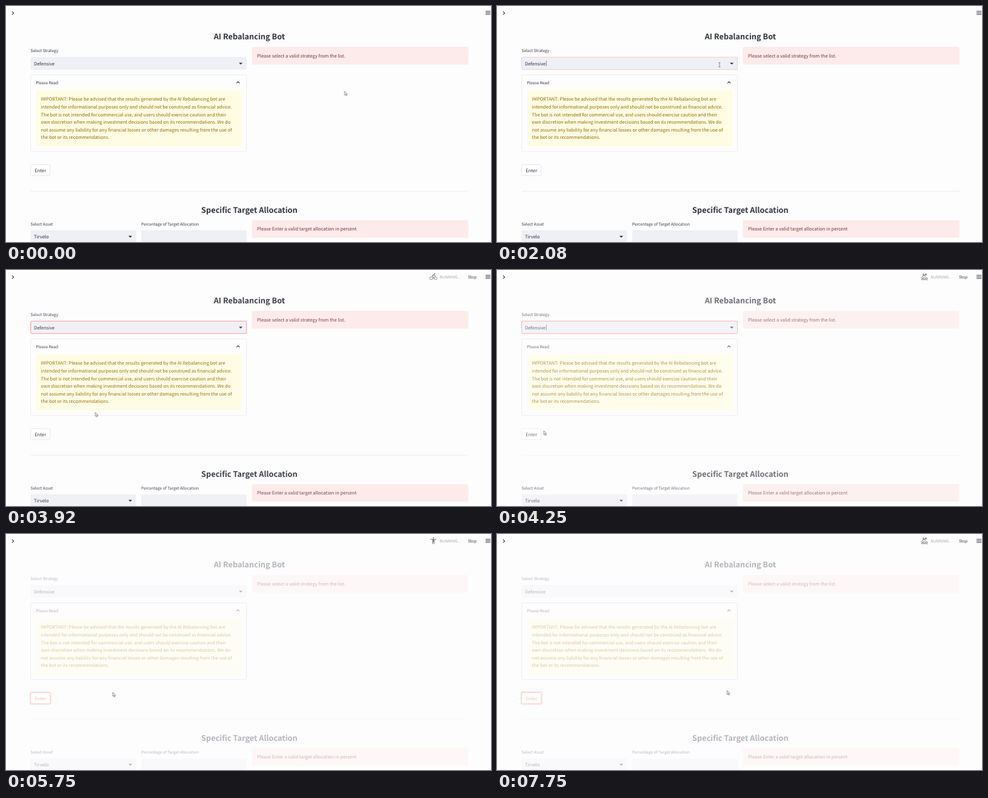
These frames come from a looping animation (800 by 389 pixels, 8000 ms). An HTML page:

```html
<!DOCTYPE html>
<html lang="en">
<head>
<meta charset="utf-8">
<title>Rebalancing dashboard</title>
<style>
  html, body { margin: 0; width: 100%; height: 100%; overflow: hidden; background: #fefdfe; }
  svg {
    display: block; width: 100%; height: 100%;
    font: 7.55px "Noto Sans CJK JP", "Noto Sans CJK SC", "Noto Sans CJK", "Noto Sans", sans-serif;
    fill: #31333f; text-rendering: geometricPrecision;
  }
  text { white-space: pre; }
  .label { font-size: 6.58px; }
  .title { font-size: 12.76px; font-weight: 600; text-anchor: middle; }
  .field { fill: #eff0f5; }
  .alert { fill: #fdeaea; }
  .error { fill: #7d353b; }
  .note { fill: #fffce4; }
  .warning { fill: #926c05; }
  .line { fill: none; stroke: #31333f; stroke-width: 1.1; }
  .frame { fill: none; stroke: #e0e0e8; stroke-width: .6; }

  .page, .status, .focus, .caret, .button, .button text, .ring,
  .pointer, .arrow, .beam, .hand { animation: 8s linear infinite; }

  .page { animation-name: fade; }
  @keyframes fade {
    0%, 46.25% { opacity: 1; animation-timing-function: ease-in; }
    57.2%, 100% { opacity: .35; }
  }

  .status { animation-name: status; }
  @keyframes status { 0%, 40.5% { opacity: 0; } 42%, 100% { opacity: 1; } }

  .focus { fill: none; stroke: #ff4b4b; stroke-width: .6; animation-name: focus; }
  @keyframes focus {
    0%, 25% { opacity: 0; } 27.5%, 55.8% { opacity: .95; } 56.8%, 100% { opacity: 0; }
  }

  .caret { animation-name: caret; animation-timing-function: step-end; }
  @keyframes caret {
    0% { opacity: 0; } 25.5% { opacity: 1; } 31.8% { opacity: 0; }
    38.2% { opacity: 1; } 44.4% { opacity: 0; } 50.8% { opacity: 1; } 56.2%, 100% { opacity: 0; }
  }

  .button { fill: #fff; stroke: #d6d6d9; stroke-width: .6; animation-name: press; animation-timing-function: step-end; }
  @keyframes press {
    0% { fill: #fff; stroke: #d6d6d9; }
    54.4% { fill: #fff; stroke: #ff4b4b; }
    56.2% { fill: #ff4b4b; stroke: #ff4b4b; }
    59.3%, 100% { fill: #fff; stroke: #ff4b4b; }
  }
  .button text { stroke: none; text-anchor: middle; animation-name: caption; animation-timing-function: step-end; }
  @keyframes caption {
    0% { fill: #31333f; } 54.4% { fill: #ff4b4b; } 56.2% { fill: #fff; } 59.3%, 100% { fill: #ff4b4b; }
  }
  .ring { fill: none; stroke: #ff4b4b; stroke-opacity: .5; stroke-width: 1.7; animation-name: ring; animation-timing-function: step-end; }
  @keyframes ring { 0% { opacity: 0; } 56.2%, 100% { opacity: 1; } }

  .pointer { fill: #fff; stroke: #555660; stroke-width: .7; stroke-linejoin: round; animation-name: travel; }
  @keyframes travel {
    0%, 12.5% { transform: translate(558.5px, 140.5px); animation-timing-function: ease-in-out; }
    21.5%, 30% { transform: translate(367px, 97px); animation-timing-function: ease-in-out; }
    35%, 38.75% { transform: translate(351.5px, 111.5px); animation-timing-function: ease-in; }
    49% { transform: translate(147.5px, 234.5px); animation-timing-function: ease-out; }
    55%, 64.6% { transform: translate(66px, 270px); animation-timing-function: ease-in; }
    71.9% { transform: translate(176.5px, 261px); }
    80.5% { transform: translate(378.5px, 258.5px); }
    84.4%, 100% { transform: translate(379.5px, 258px); }
  }
  .arrow, .beam, .hand { animation-timing-function: step-end; }
  .arrow { animation-name: arrow; }
  @keyframes arrow {
    0% { opacity: 1; } 20% { opacity: 0; } 40.5% { opacity: 1; } 53.8% { opacity: 0; } 66.8%, 100% { opacity: 1; }
  }
  .beam { fill: none; animation-name: beam; }
  @keyframes beam { 0% { opacity: 0; } 20% { opacity: 1; } 33%, 100% { opacity: 0; } }
  .hand { animation-name: hand; }
  @keyframes hand {
    0% { opacity: 0; } 33% { opacity: 1; } 40.5% { opacity: 0; } 53.8% { opacity: 1; } 66.8%, 100% { opacity: 0; }
  }

  .icon { fill: #777880; stroke: none; visibility: hidden; }
  .icon path { fill: none; stroke: #777880; stroke-width: 2; }
  .icon path.solid { fill: #777880; stroke: none; }
  .icon .wheel { fill: none; stroke: #777880; stroke-width: 1.5; }
</style>
</head>
<body>
<svg viewBox="0 0 800 389" preserveAspectRatio="none">
  <path class="line" d="M10 9.2l2.7 2.6-2.7 2.6"/>
  <path class="line" d="M791 8.8h8M791 11.3h8M791 13.8h8"/>

  <g class="status">
    <g transform="translate(698.4 4.4) scale(.547)">
      <g class="icon">
        <circle class="wheel" cx="5" cy="17" r="4.25"/><circle class="wheel" cx="19" cy="17" r="4.25"/>
        <circle cx="15.5" cy="3.5" r="2"/>
        <path d="M12 19v-5.6L8.3 9.8 12.5 6l3 3Q17 10 19.1 10"/>
      </g>
      <g class="icon">
        <circle cx="13.5" cy="3.5" r="2"/>
        <path d="M7 13V9.1l4.5-2 2.5 3Q16 12 19 12M11.5 7l-1.6 8.8-6-1.3M10.5 14l3.4 2.5V23"/>
      </g>
      <g class="icon">
        <circle cx="16.5" cy="5.5" r="2.5"/>
        <path d="M6 4.5h3l6.5 7.5M10.5 7.5l-5 5M2 16.2q1.7-1.7 3.3 0t3.4 0 3.3 0 3.4 0 3.3 0 3.3 0M2 20.6q1.7-1.7 3.3 0t3.4 0 3.3 0 3.4 0 3.3 0 3.3 0"/>
      </g>
      <g class="icon">
        <circle cx="15" cy="3" r="2"/>
        <path d="M7 11.4Q10 11.3 12 9l2-2q1.5-.8 1.8 1.3v6.2l-2.5-2.5M7.5 11.5L18.5 22.5M9.5 15l-5 5"/>
      </g>
      <g class="icon">
        <circle cx="12" cy="4" r="2"/>
        <path d="M3.2 7.5Q12 9.6 20.8 7.5"/><path class="solid" d="M9 8h6v14h-2v-6h-2v6H9z"/>
      </g>
      <g class="icon">
        <circle cx="13.5" cy="3.5" r="2"/>
        <path d="M7 13V8.9l4-1.8 2.5 3Q15.5 12 18.5 12M11 7.2L7.5 23M10 13.5l3 3V23"/>
      </g>
    </g>
    <text class="label" x="715.3" y="13.7" opacity=".42">RUNNING...</text>
    <text class="label" x="761.9" y="13.7">Stop</text>
  </g>

  <rect class="frame" x="40.7" y="113.5" width="356" height="126.3" rx="2"/>

  <g class="page">
    <text class="title" x="401.4" y="54.9">AI Rebalancing Bot</text>

    <text class="label" x="40.5" y="75.8">Select Strategy</text>
    <rect class="field" x="40.5" y="84" width="356.5" height="21" rx="2"/>
    <rect class="focus" x="40.7" y="84.2" width="356" height="20.6" rx="2"/>
    <text x="46" y="97.5">Defensive</text>
    <path class="caret line" style="stroke-width:.6" d="M81.5 90.2v9"/>
    <path d="M384.2 93.4h6l-3 3.2z"/>

    <rect class="alert" x="405.5" y="67.5" width="357" height="29" rx="2"/>
    <text class="error" x="414" y="84.9">Please select a valid strategy from the list.</text>

    <text class="label" x="49.2" y="128.8">Please Read</text>
    <path class="line" d="M380.2 127.4l2.5-2.5 2.5 2.5"/>
    <rect class="note" x="49.3" y="139" width="339.2" height="92.4" rx="2"/>
    <g class="warning">
      <text x="57.6" y="156.4">IMPORTANT: Please be advised that the results generated by the AI Rebalancing bot are</text>
      <text x="57.6" y="169">intended for informational purposes only and should not be construed as financial advice.</text>
      <text x="57.6" y="181.6">The bot is not intended for commercial use, and users should exercise caution and their</text>
      <text x="57.6" y="194.2">own discretion when making investment decisions based on its recommendations. We do</text>
      <text x="57.6" y="206.8">not assume any liability for any financial losses or other damages resulting from the use of</text>
      <text x="57.6" y="219.4">the bot or its recommendations.</text>
    </g>

    <rect class="ring" x="39.8" y="260.7" width="33.8" height="19.8" rx="2.6"/>
    <g class="button">
      <rect x="40.7" y="261.6" width="32" height="18" rx="2"/>
      <text x="56.8" y="273.7">Enter</text>
    </g>

    <path class="frame" d="M40.5 305.2H762.5"/>

    <text class="title" x="401.4" y="340.6">Specific Target Allocation</text>
    <text class="label" x="40.5" y="361.5">Select Asset</text>
    <rect class="field" x="40.5" y="369.7" width="174.3" height="21" rx="2"/>
    <text x="46" y="383.2">Tirvelo</text>
    <path d="M202 378.7h6l-3 3.2z"/>
    <text class="label" x="223" y="361.5">Percentage of Target Allocation</text>
    <rect class="field" x="223" y="369.7" width="174" height="21" rx="2"/>
    <rect class="alert" x="405.5" y="353" width="357" height="29" rx="2"/>
    <text class="error" x="414" y="370.4">Please Enter a valid target allocation in percent</text>
  </g>

  <g class="pointer">
    <path class="arrow" d="M0 0v6.4l1.5-1.3 1.1 2.5 1.1-.5-1-2.4h1.9z"/>
    <path class="beam" d="M-1.5-3.5h3M0-3.5v7M-1.5 3.5h3"/>
    <path class="hand" d="M-.8 5V.5q.8-1 1.5 0V3.3l3.2.8q.8.3.7 1.2L4 8.8H.2L-2.4 5.6q-.1-1.2 1.6-.3z"/>
  </g>
</svg>
<script>
  const LOOP = 8000, FRAME = 1000 / 12, LEAD = 30;
  const ICON_STEP = 200, ICON_OFFSET = 145;
  const icons = [...document.querySelectorAll('.icon')];
  const clock = document.querySelector('.pointer').getAnimations()[0];

  // The icon changes on whole steps of a twelve-per-second rate; LEAD covers display delay.
  function draw() {
    const time = (clock.currentTime || 0) % LOOP;
    const stepped = Math.floor((time + LEAD) / FRAME) * FRAME;
    const turn = Math.max(0, Math.floor((stepped - ICON_OFFSET) / ICON_STEP));
    icons.forEach((icon, i) => {
      icon.style.visibility = i === turn % icons.length ? 'visible' : 'hidden';
    });
    requestAnimationFrame(draw);
  }
  draw();
</script>
</body>
</html>
```
